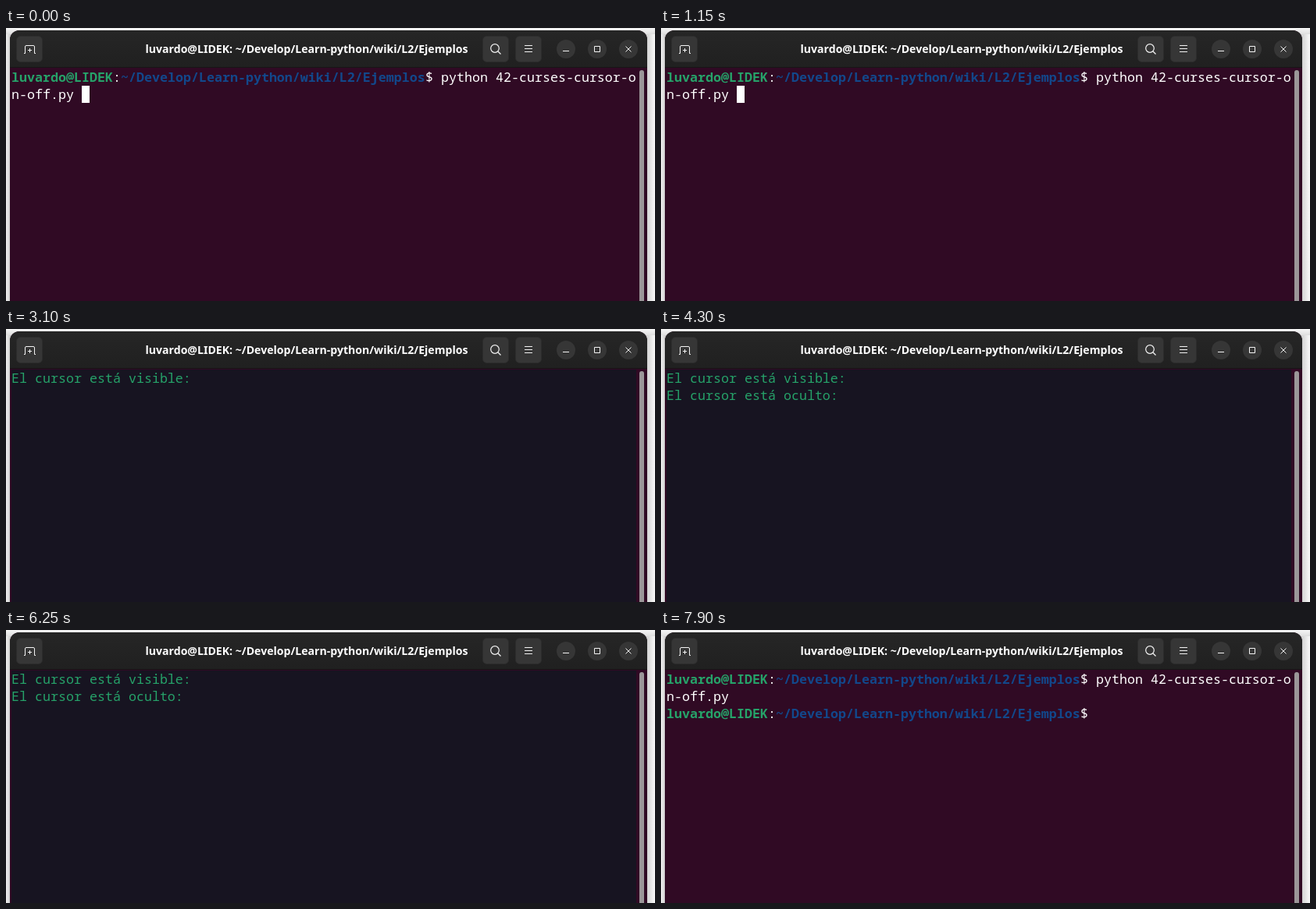
Write an HTML page that moves like this. It is 831 px wide and 350 px high and loops after 8 s.

```html
<!DOCTYPE html>
<html lang="es">
<head>
<meta charset="utf-8">
<title>Terminal</title>
<style>
  html, body { margin: 0; width: 100%; height: 100%; overflow: hidden; background: #fff; }
  svg { display: block; width: 831px; height: 350px; }
  .term text { font: 16.667px "Noto Sans Mono", "DejaVu Sans Mono", monospace; fill: #fff; white-space: pre; }
  .term .user { fill: #26a269; font-weight: 700; }
  .term .path { fill: #12488b; font-weight: 700; }
  .term .msg { fill: #26a269; }
  .title { font: 700 14.1px "Noto Sans", "Open Sans", sans-serif; fill: #fff; text-anchor: middle; }
  .btn { fill: #363636; }
  .btn rect { stroke: #2c2c2c; }
  .icon { fill: none; stroke: #f4f4f4; }
</style>
</head>
<body>
<svg viewBox="0 0 831 350">
  <defs>
    <linearGradient id="left"><stop stop-color="#f1f1f1"/><stop offset="1" stop-color="#c9c9c9"/></linearGradient>
    <linearGradient id="right"><stop stop-color="#cfcfcf"/><stop offset="1" stop-color="#fafafa"/></linearGradient>
    <linearGradient id="top" x2="0" y2="1"><stop stop-color="#f6f6f6"/><stop offset="1" stop-color="#dedede"/></linearGradient>
    <linearGradient id="bar" x2="0" y2="1"><stop stop-color="#262626"/><stop offset="1" stop-color="#202020"/></linearGradient>
  </defs>

  <rect width="831" height="350" fill="#fff"/>
  <rect y="8" width="6" height="342" fill="url(#left)"/>
  <rect x="820" y="8" width="11" height="342" fill="url(#right)"/>
  <rect width="831" height="8" fill="url(#top)"/>
  <path d="M5 350V15a12 12 0 0 1 12-12H809a12 12 0 0 1 12 12V350z" fill="#300a24"/>
  <path d="M5 51V15a12 12 0 0 1 12-12H809a12 12 0 0 1 12 12V51z" fill="url(#bar)"/>
  <path d="M5 50.5H821" stroke="#161616"/>

  <g class="btn">
    <rect x="13.5" y="10.5" width="33" height="33" rx="5"/>
    <rect x="610.5" y="10.5" width="33" height="33" rx="5"/>
    <rect x="652.5" y="10.5" width="33" height="33" rx="5"/>
    <circle cx="717" cy="27" r="12"/>
    <circle cx="757" cy="27" r="12"/>
    <circle cx="797" cy="27" r="12"/>
  </g>
  <g class="icon">
    <path d="M23 32.5h1.5v-8.5a1.5 1.5 0 0 1 1.5-1.5h9a1.5 1.5 0 0 1 1.5 1.5v8.5H38M28 28.5h5M30.5 26v5"/>
    <circle cx="626" cy="26" r="5.3" stroke-width="1.2"/>
    <path d="M630 30l3.5 3.5" stroke-width="1.2"/>
    <path d="M664 22.5h10M664 26.5h10M664 30.5h10"/>
    <path d="M713 29.5h8M753.5 23.5h7v7h-7zM793.5 23.5l7 7M800.5 23.5l-7 7"/>
  </g>
  <text class="title" id="title" x="385" y="32"></text>

  <g class="term">
    <g id="shell"></g>
    <g id="curses"><rect x="7" y="52" width="800" height="298" fill="#171421"/></g>
    <rect id="cursor" width="10" height="22"/>
  </g>
  <g id="beam" fill="none">
    <path d="M225 315.5h5M225 329.5h5M227.5 315v15" stroke="#fff" stroke-width="3"/>
    <path d="M225 315.5h5M225 329.5h5M227.5 315v15" stroke="#000"/>
  </g>
  <rect x="811" y="54" width="6" height="310" rx="3" fill="#9b9799"/>
</svg>

<script>
const LOOP = 8000, CELL = 10, ROW = 22, LEFT = 7, TOP = 52;
const USER = 'luvardo@LIDEK', PATH = '~/Develop/Learn-python/wiki/L2/Ejemplos';
const $ = id => document.getElementById(id);
const shell = $('shell'), curses = $('curses'), cursor = $('cursor'), beam = $('beam');

function put(parent, col, row, str, cls = '') {
  const t = document.createElementNS('http://www.w3.org/2000/svg', 'text');
  t.setAttribute('x', LEFT + col * CELL);
  t.setAttribute('y', TOP + row * ROW + 17);
  t.setAttribute('class', cls);
  t.textContent = str;
  parent.appendChild(t);
  return t;
}

function prompt(row) {
  const at = USER.length + 1, end = at + PATH.length;
  return [
    put(shell, 0, row, USER, 'user'),
    put(shell, at - 1, row, ':'),
    put(shell, at, row, PATH, 'path'),
    put(shell, end, row, '$')
  ];
}

$('title').textContent = `${USER}: ${PATH}`;
prompt(0);
put(shell, 55, 0, 'python 42-curses-cursor-o');
put(shell, 0, 1, 'n-off.py');
const again = prompt(2);
put(curses, 0, 0, 'El cursor está visible:', 'msg');
const hidden = put(curses, 0, 1, 'El cursor está oculto:', 'msg');

const show = (el, on) => el.setAttribute('visibility', on ? 'visible' : 'hidden');

function placeCursor(col, row, color) {
  cursor.setAttribute('x', LEFT + col * CELL);
  cursor.setAttribute('y', TOP + row * ROW);
  cursor.setAttribute('fill', color);
}

function draw(t) {
  const running = t >= 1300 && t < 7400, done = t >= 7400;
  curses.setAttribute('display', running ? 'inline' : 'none');
  shell.setAttribute('display', running ? 'none' : 'inline');
  again.forEach(el => show(el, done));
  show(hidden, t >= 4300);
  show(beam, t >= 6200 && t < 6250);

  let lit;
  if (running) {
    placeCursor(24, 0, '#d0cfcc');
    lit = t < 4300 && Math.floor((t - 1300) / 600) % 2 === 0;
  } else if (done) {
    placeCursor(55, 2, '#fff');
    lit = t < 7900;
  } else {
    placeCursor(9, 1, '#fff');
    lit = t < 550 || t >= 1150;
  }
  show(cursor, lit);
}

const start = performance.now();
function tick() {
  draw((performance.now() - start) % LOOP);
  requestAnimationFrame(tick);
}
tick();
</script>
</body>
</html>
```
